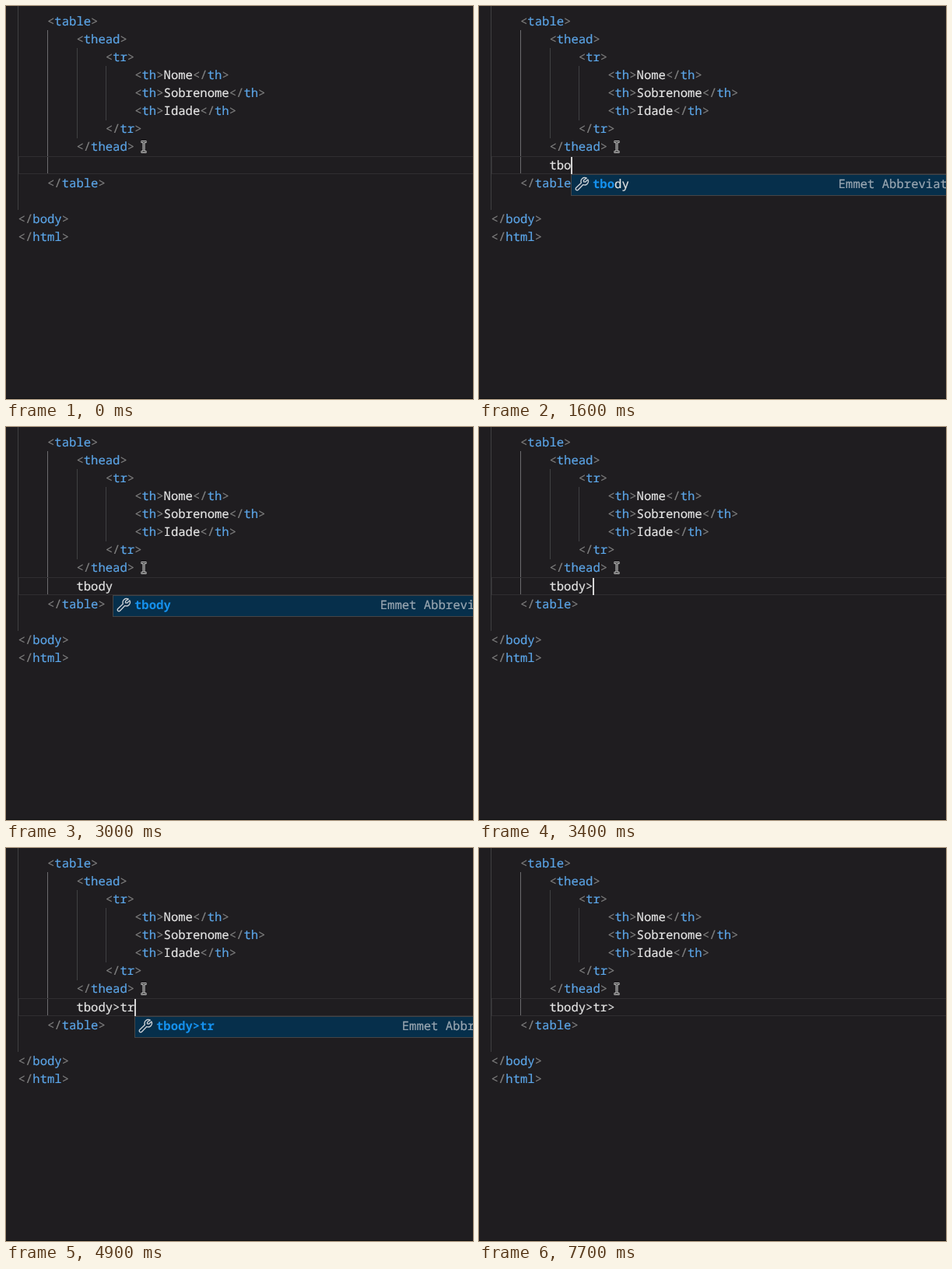
Recreate the animation shown at these times as an HTML page. Size 600 by 505 pixels, loop 8 s.

```html
<!DOCTYPE html>
<html lang="pt">
<head>
<meta charset="utf-8">
<title>Table body abbreviation</title>
<style>
  html, body { margin: 0; width: 100%; height: 100%; overflow: hidden; background: #1f1d20; }
  #stage {
    position: relative; width: 600px; height: 505px; overflow: hidden; color: #e4e4e4;
    font: 15.58px/23.1px "Noto Sans Mono", "DejaVu Sans Mono", monospace;
    font-variant-ligatures: none; text-rendering: geometricPrecision; white-space: pre;
    -webkit-text-stroke: 0.2px;
  }
  #stage > * { position: absolute; }
  #code { left: 15.6px; top: 7.7px; margin: 0; font: inherit; }
  i { font-style: normal; color: #808080; }
  b { font-weight: normal; color: #5ba4e6; }
  .guide { width: 1px; background: #404042; }
  .guide.active { background: #6c6c6e; }
  #line { left: 16px; top: 193px; width: 600px; height: 21px; border: 1px solid #302e31; }
  #typed { left: 90.4px; top: 192.5px; }
  #caret { top: 194px; width: 2px; height: 22px; background: #d4d4d4; }
  #popup { top: 216px; width: 620px; border: 1px solid #454547; background: #252527; }
  .row { position: relative; height: 23.1px; }
  .row.selected { height: 26px; background: #062f4b; }
  .row span { position: absolute; left: 27px; top: 0.3px; }
  .row em { position: absolute; left: 342.7px; top: 0.3px; font-style: normal; color: #9aa7b2; }
  .row strong { font-weight: 600; color: #1591ee; -webkit-text-stroke: 0; }
  .row svg { position: absolute; left: 4px; top: 2px; }
  #edge { left: 0; top: 504px; width: 600px; height: 1px; background: #101011; }
</style>
</head>
<body>
<div id="stage">
  <div id="line"></div>
  <pre id="code"></pre>
  <div id="typed"></div>
  <svg id="mouse" style="left:171px;top:172px" width="12" height="18" fill="none">
    <path d="M2.5 2.5H9.5M6 2.5V15.5M2.5 15.5H9.5" stroke="#d0d0d0" stroke-width="3"/>
    <path d="M3 2.5H9M6 2.5V15.5M3 15.5H9" stroke="#2a2a2a"/>
  </svg>
  <div id="popup"></div>
  <div id="caret"></div>
  <div id="edge"></div>
</div>
<script>
const $ = id => document.getElementById(id);
const LOOP = 8000, BLINK = 500, CHAR = 9.348, TEXT_X = 90.4;

const source = `    <table>
        <thead>
            <tr>
                <th>Nome</th>
                <th>Sobrenome</th>
                <th>Idade</th>
            </tr>
        </thead>

    </table>

</body>
</html>`;

// x, top, bottom, active
const guides = [[15, 0, 262], [53, 31, 216, true], [91, 54, 170], [128, 77, 147]];

// time, typed text, start of the caret's blink cycle
const keys = [
  [0, '', -500],
  [800, 't', 800],
  [1300, 'tb', 1300],
  [1500, 'tbo', 1500],
  [1800, 'tbod', 1800],
  [2100, 'tbody', 2100],
  [3400, 'tbody>', 3400],
  [4600, 'tbody>t', 4600],
  [4700, 'tbody>tr', 4700],
  [6200, 'tbody>tr>', 6100]
];
const tags = 'table table+ tarea tbody td textarea tfoot th thead time title tmpl'.split(' ');

const wrench = `<svg width="19" height="19" viewBox="0 0 19 19" fill="none" stroke="#c9ced3"
  stroke-width="1.4" stroke-linejoin="round"><path d="M15.2 2.2A4.8 4.8 0 0 0 8.4 8.2L1.8 14.6
  A1.8 1.8 0 0 0 4.4 17.2L10.8 10.6A4.8 4.8 0 0 0 16.9 4L13.8 7L11.4 6.8L11.6 4.8Z"/></svg>`;

const escape = s => s.replace(/</g, '&lt;').replace(/>/g, '&gt;');

function suggestions(text) {
  if (!text || text.endsWith('>')) return [];
  if (text.includes('>')) return [text];
  return tags.filter(tag => tag.startsWith(text));
}

function row(label, text, index) {
  const match = escape(text), rest = escape(label.slice(text.length));
  return `<div class="row${index ? '' : ' selected'}">${wrench}` +
    `<span><strong>${match}</strong>${rest}</span>` +
    (index ? '' : '<em>Emmet Abbreviation</em>') + '</div>';
}

function showText(text) {
  const items = suggestions(text);
  const left = Math.round(TEXT_X + text.length * CHAR - 0.5) + 'px';
  $('typed').textContent = text;
  $('caret').style.left = $('popup').style.left = left;
  $('popup').style.display = items.length ? 'block' : 'none';
  $('popup').innerHTML = items.map((label, i) => row(label, text, i)).join('');
}

$('code').innerHTML = source.replace(/(<\/?)(\w+)(>)/g,
  (_, open, name, close) => `<i>${escape(open)}</i><b>${name}</b><i>${escape(close)}</i>`);

for (const [x, top, bottom, active] of guides) {
  const guide = document.createElement('div');
  guide.className = active ? 'guide active' : 'guide';
  guide.style.cssText = `left:${x}px;top:${top}px;height:${bottom - top}px`;
  $('stage').prepend(guide);
}

let shown;
function draw() {
  const time = performance.now() % LOOP;
  const key = keys.findLast(([start]) => start <= time);
  if (key !== shown) showText((shown = key)[1]);
  const blinkOn = Math.floor((time - key[2]) / BLINK) % 2 === 0;
  $('caret').style.visibility = blinkOn ? 'visible' : 'hidden';
  requestAnimationFrame(draw);
}
draw();
</script>
</body>
</html>
```
